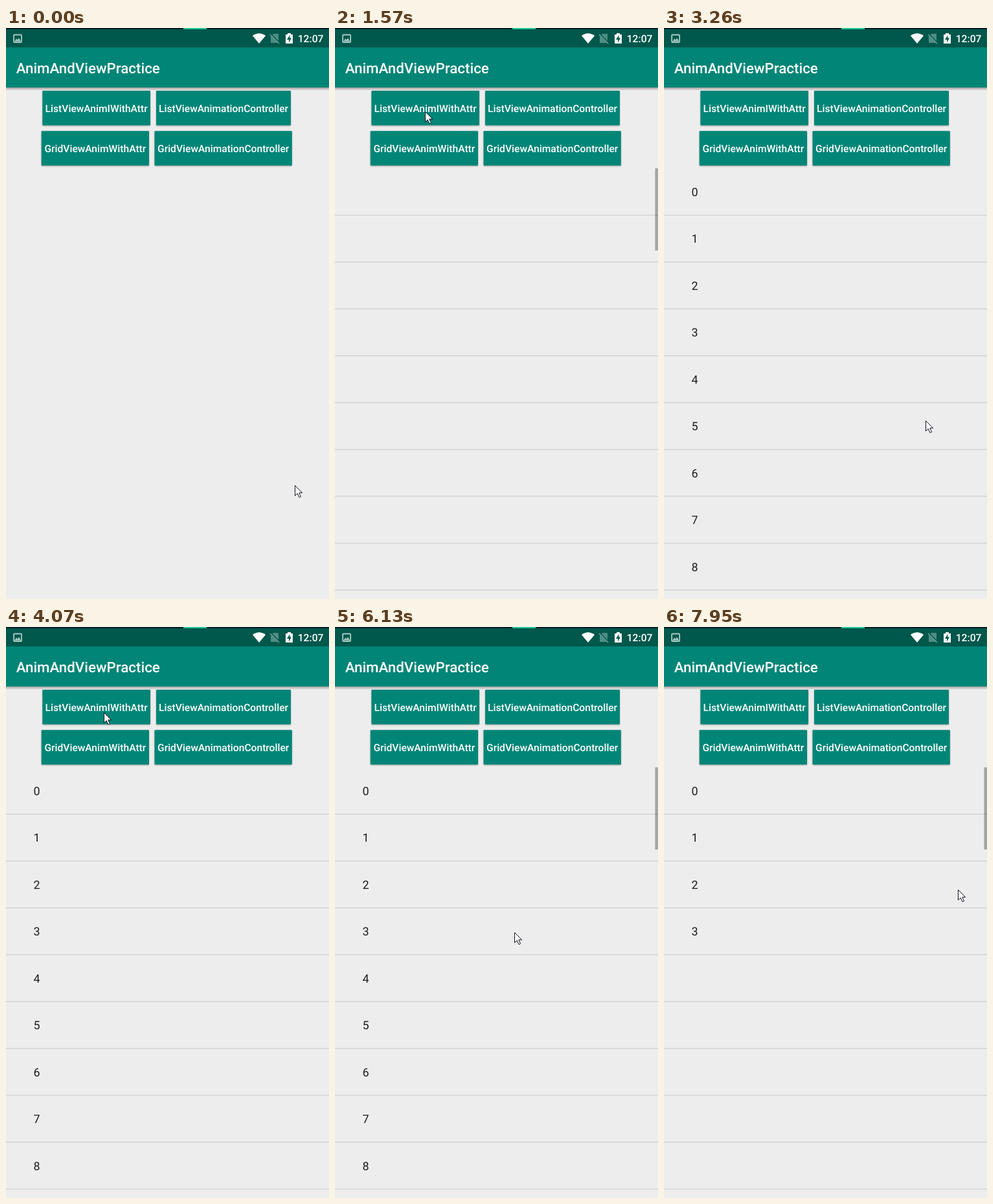
Recreate the animation shown at these times as an HTML page. Size 499x883 px, loop 8000 ms.

```html
<!DOCTYPE html>
<html lang="en">
<head>
<meta charset="utf-8">
<title>List animation demo</title>
<style>
html, body { margin: 0; width: 100%; height: 100%; overflow: hidden; background: #ededed; }
svg { display: block; width: 100%; height: 100%; font-family: Roboto, "Noto Sans", sans-serif; text-rendering: geometricPrecision; }
.medium { font-weight: 500; fill: #fff; }
</style>
</head>
<body>
<svg viewBox="0 0 499 883">
  <defs>
    <linearGradient id="shade" x1="0" y1="0" x2="0" y2="1">
      <stop offset="0" stop-opacity=".32"/>
      <stop offset="1" stop-opacity="0"/>
    </linearGradient>
  </defs>
  <rect width="499" height="883" fill="#ededed"/>
  <g id="list">
    <g id="lines" fill="#cbcbcb"></g>
    <g id="items" font-size="17.85" fill="#1c1c1c"></g>
  </g>
  <rect id="bar" x="494.5" y="217" width="4.5" height="127" fill-opacity=".31"/>
  <g id="buttons"></g>

  <rect y="92" width="499" height="5" fill="url(#shade)"/>
  <rect y="30" width="499" height="62" fill="#008577"/>
  <rect width="499" height="30" fill="#00574b"/>
  <rect width="499" height="2" fill="#071c22"/>
  <rect x="274" width="36" height="2" fill="#1fc796"/>
  <text class="medium" x="15.7" y="70" font-size="22.3">AnimAndViewPractice</text>
  <text class="medium" x="490.5" y="22" font-size="15.7" text-anchor="end">12:07</text>

  <rect x="12" y="10.500" width="12" height="11.500" rx="1" fill="none" stroke="#a9cbc5" stroke-width="1.800"/>
  <path d="M13 20.500L16 16.500L17.800 18.500L20 15.500L23 20.500z" fill="#a9cbc5"/>
  <path d="M381 12Q391 4.500 401 12L391 24z" fill="#fff"/>
  <path d="M413 9H421V23H409V13z" fill="#4f8d84"/>
  <path d="M408 9L422 23" stroke="#00574b" stroke-width="3"/>
  <path d="M408 10L422 24" stroke="#6fa49c" stroke-width="1.500"/>
  <path d="M435 8H440V10H443V24H432V10H435z" fill="#fff"/>
  <path d="M438.500 11L434 18H437V22.500L441 15.500H438.500z" fill="#00574b"/>

  <path id="cursor" d="M.5 .5V16.200L4.200 12.800L7 18.900L9.500 17.800L6.800 11.800H11.700z" fill="#fff" stroke="#10101f"/>
</svg>
<script>
const LOOP = 8000, ROWS = 9, PITCH = 72.45, WIDTH = 499;
const $ = id => document.getElementById(id);
const clamp = v => Math.max(0, Math.min(1, v));
const ease = u => (1 - Math.cos(Math.PI * u)) / 2;

function add(parent, tag, attrs, text = "") {
  const el = document.createElementNS("http://www.w3.org/2000/svg", tag);
  for (const k in attrs) el.setAttribute(k, attrs[k]);
  el.textContent = text;
  return parent.appendChild(el);
}

function addButton(x, y, width, label) {
  const box = add($("buttons"), "rect", { x, y, width, height: 53.5, rx: 1, fill: "#008577" });
  add($("buttons"), "text", {
    class: "medium", x: x + width / 2, y: y + 33, "font-size": 15.6, "text-anchor": "middle"
  }, label);
  raise(box, 0);
  return box;
}

function raise(box, k) {
  box.style.filter = `drop-shadow(0 ${1 + 1.5 * k}px ${0.8 + 1.5 * k}px rgba(0,0,0,${0.32 + 0.12 * k}))`;
}

const listButton = addButton(56.3, 97, 166.7, "ListViewAnimIWithAttr");
const controllerButton = addButton(232, 97, 208, "ListViewAnimationController");
addButton(54.7, 159.3, 166.3, "GridViewAnimWithAttr");
addButton(229.5, 159.3, 212.3, "GridViewAnimationController");

const items = Array.from({ length: ROWS }, (_, i) => {
  add($("lines"), "rect", { y: 288.9 + i * PITCH, width: WIDTH, height: 1.12 });
  return add($("items"), "text", { y: 260 + i * PITCH }, i);
});

// Where the pointer comes to rest, when it arrives and when it leaves
const stops = [
  { x: 446, y: 707, arrive: 0, leave: 60 },
  { x: 139, y: 129, arrive: 1100, leave: 1640 },
  { x: 361, y: 573, arrive: 2400, leave: 2900 },
  { x: 404, y: 607, arrive: 3260, leave: 3320 },
  { x: 151, y: 132, arrive: 3900, leave: 4070 },
  { x: 129, y: 121, arrive: 4540, leave: 5680 },
  { x: 277, y: 472, arrive: 6130, leave: 6130 },
  { x: 406, y: 380, arrive: 6490, leave: 6550 },
  { x: 316, y: 121, arrive: 7300, leave: 7600 },
  { x: 454, y: 406, arrive: 7940, leave: LOOP }
];

function movePointer(t) {
  const n = stops.findIndex(s => t <= s.leave);
  const to = stops[n], from = stops[n - 1] || to;
  const u = t < to.arrive ? ease((t - from.leave) / (to.arrive - from.leave)) : 1;
  const at = k => Math.round(from[k] + (to[k] - from[k]) * u);
  $("cursor").setAttribute("transform", `translate(${at("x")} ${at("y")})`);
}

// Each reload slides the rows in, one after another
const first = { start: 1480, time: 500, gap: 150 };
const second = { start: 7560, time: 150, gap: 70 };
const presses = [4700, 5010, 5380];
const wakes = [first.start, 4480, ...presses, second.start];

const pressAt = (t, start) => Math.sin(Math.PI * clamp((t - start) / 250));

// The scrollbar stays a while after each wake, then fades
const barAt = (t, wake) => t < wake ? 0 : 1 - clamp((t - wake - 1220) / 250);

function render(t) {
  movePointer(t);
  const { start, time, gap } = t < second.start ? first : second;
  $("list").setAttribute("visibility", t < start ? "hidden" : "visible");
  items.forEach((el, i) => {
    const left = 1 - ease(clamp((t - start - i * gap) / time));
    el.setAttribute("x", 42.4 - WIDTH * left);
  });
  $("bar").setAttribute("opacity", Math.max(...wakes.map(w => barAt(t, w))));
  raise(listButton, Math.max(...presses.map(p => pressAt(t, p))));
  raise(controllerButton, pressAt(t, second.start));
}

const began = performance.now();
function tick() {
  render((performance.now() - began) % LOOP);
  requestAnimationFrame(tick);
}
tick();
</script>
</body>
</html>
```
